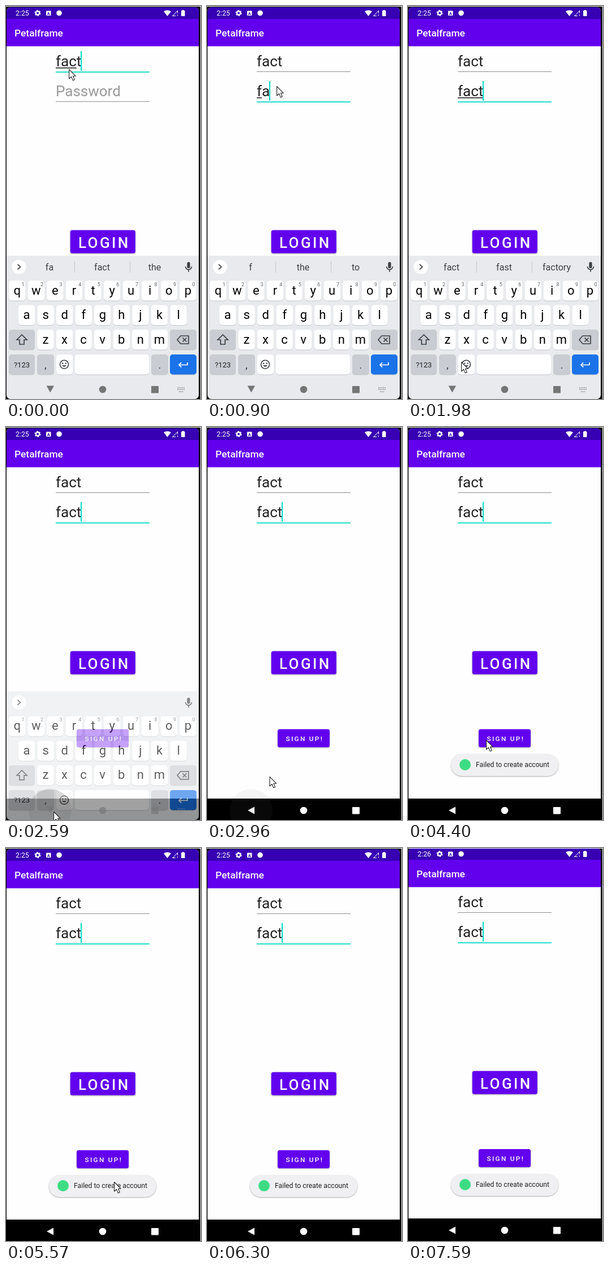
Write an HTML page that moves like this. It is 345 by 697 pixels and loops after 8000 ms.

```html
<!DOCTYPE html>
<html lang="en">
<head>
<meta charset="utf-8">
<title>Login screen</title>
<style>
html, body { margin: 0; width: 100%; height: 100%; overflow: hidden; background: #000; }
svg { display: block; width: 345px; height: 697px; font-family: Roboto, sans-serif; }
text { white-space: pre; }
.mid { text-anchor: middle; }
.med { font-weight: 500; }
.raised { filter: drop-shadow(0 1px 1px #0005); }
.soft { filter: drop-shadow(0 .5px .7px #0003); }
.line { fill: none; stroke-width: 1.7; }
</style>
</head>
<body>
<svg id="stage" viewBox="0 0 345 697"></svg>
<script>
const LOOP = 8000, WORD = 'fact';
const stage = document.getElementById('stage');

const rect = (x, y, w, h, fill, more = '') =>
  `<rect x="${x}" y="${y}" width="${w}" height="${h}" fill="${fill}" ${more}/>`;
const disc = (x, y, r, fill, more = '') =>
  `<circle cx="${x}" cy="${y}" r="${r}" fill="${fill}" ${more}/>`;
const path = (d, fill, more = '') => `<path d="${d}" fill="${fill}" ${more}/>`;
const line = (d, color, more = '') => `<path class="line" d="${d}" stroke="${color}" ${more}/>`;
const text = (x, y, size, fill, s, more = '') =>
  `<text x="${x}" y="${y}" font-size="${size}" fill="${fill}" ${more}>${s}</text>`;
const group = (id, body, more = '') => `<g id="${id}" ${more}>${body}</g>`;

function key(x, y, w, label = '', size = 22, fill = '#fff') {
  return rect(x, y + 1, w, 35.5, '#c3c6ca', 'rx="5"') + rect(x, y, w, 35.5, fill, 'rx="5"') +
    text(x + w / 2, y + (size > 15 ? 24.5 : 22.5), size, size > 20 ? '#000' : '#202124', label, 'class="mid"');
}

function keyRow(letters, x, y, hints = '') {
  return [...letters].map((c, i) => {
    const left = x + i * 33.57;
    return key(left, y, 29.5, c) +
      (hints ? text(left + 25, y + 9.5, 9, '#5f6368', hints[i], 'class="mid"') : '');
  }).join('');
}

function keyboard() {
  const grey = '#c9ccd2', ink = '#3c4043';
  return rect(1, 443, 340, 320, '#e8eaed') +
    disc(23, 462.7, 13, '#fff', 'class="soft"') +
    line('M20.5 458.2l5 4.5-5 4.5', ink, 'id="chevron"') +
    group('strip', rect(121, 453, 1, 20, '#c4c7cb') + rect(219, 453, 1, 20, '#c4c7cb') +
      [77, 170, 263].map(x => text(x, 469, 16, ink, '', 'class="mid"')).join('')) +
    rect(320.4, 454, 5.2, 11, ink, 'rx="2.6"') +
    line('M317.5 462a5.5 5.5 0 0 0 11 0M323 467.5v4', ink) +
    keyRow('qwertyuiop', 5, 487, '1234567890') +
    keyRow('asdfghjkl', 21.8, 530.5) +
    keyRow('zxcvbnm', 55.2, 574) +
    key(5, 574, 46, '', 22, grey) + key(290, 574, 47, '', 22, grey) +
    line('M28 583l-9 9h5v8h8v-8h5z', ink) +
    line('M309 585h14v14h-14l-6-7zM312.5 588.5l7 7m0-7l-7 7', ink) +
    key(5, 618, 46, '?123', 13, grey) + key(55, 618, 30, ',', 17, grey) +
    key(89, 618, 29) + key(122, 618, 131) +
    key(257, 618, 30, '.', 17, grey) + key(290, 618, 47, '', 22, '#1a73e8') +
    disc(103, 635.7, 7.5, 'none', `stroke="${ink}" stroke-width="1.6"`) +
    disc(100.3, 633.7, 1.2, ink) + disc(105.7, 633.7, 1.2, ink) +
    path('M99 637.2h8q-4 5.5-8 0z', ink) +
    line('M321 632v4.5h-15m4.2-4.2l-4.2 4.2 4.2 4.2', '#fff');
}

function statusBar() {
  return rect(1, 2, 340, 21, '#3700b3') +
    text(17, 17, 12.3, '#fff', '2:25', 'id="clock"') +
    disc(56, 12.5, 3.2, 'none', 'stroke="#fff" stroke-width="2.4"') +
    disc(56, 12.5, 4.8, 'none', 'stroke="#fff" stroke-width="1.4" stroke-dasharray="2.5 2.53"') +
    rect(71, 8.5, 8.5, 8.5, '#fff', 'rx="1"') +
    text(75.2, 15.6, 7.5, '#3700b3', 'A', 'class="mid" font-weight="700"') +
    disc(94, 12.5, 4.8, '#fff') +
    path('M279 9.5q6.5-4 13 0l-6.5 8.5z', '#fff') +
    line('M295 17.5l8-8.5', '#fff', 'style="stroke-width:1"') +
    line('M294 17.5h6M303.5 8v5m0 2v2.5', '#fff', 'style="stroke-width:1"') +
    rect(310, 8, 6.5, 10, '#fff', 'rx="1"') + rect(312, 7, 2.5, 2, '#fff');
}

const button = (id, x, y, w, h) => rect(x, y, w, h, '#6200ee', `id="${id}" rx="3.5" class="raised"`);

stage.innerHTML =
  `<defs><clipPath id="screen">${rect(1, 2, 340, 695, '#000', 'rx="7"')}</clipPath></defs>` +
  rect(0, 0, 345, 697, '#000') +
  group('phone',
    rect(1, 2, 340, 657, '#fefefe') +
    rect(1, 23, 340, 48.4, '#6200ee') + statusBar() +
    text(15, 54, 17.4, '#fff', 'Petalframe', 'class="med"') +
    text(88, 107, 26, '#212121', WORD, 'id="user"') +
    text(88, 160.3, 26, '#9a9a9a', 'Password', 'id="pass"') +
    rect(88, 116, 166, 2, '#03dac5', 'id="userLine"') +
    rect(88, 169, 166, 1, '#8f8f8f', 'id="passLine"') +
    rect(88, 109, 0, 1.6, '#212121', 'id="under"') +
    rect(132, 80, 2, 35, '#03dac5', 'id="caret"') +
    button('login', 113.7, 397.5, 115.2, 41) +
    text(128, 428.5, 26, '#fff', 'LOGIN', 'class="med" letter-spacing="3.35"') +
    button('sign', 125, 536, 92, 32) +
    rect(125, 536, 92, 32, '#fff', 'id="glow" rx="3.5"') +
    text(139.5, 556.8, 11.8, '#fff', 'SIGN UP!', 'class="med" letter-spacing="2.3"') +
    group('toast',
      rect(76, 580, 190, 39, '#f0f0f2', 'id="pill" rx="19.5" class="raised"') +
      group('note', disc(101, 599, 10, '#3ddc84') +
        text(120, 603.3, 12.2, '#222', 'Failed to create account'))) +
    rect(1, 659, 340, 40, '#000') +
    group('openNav', path('M72 680l12-6.5v13z', '#fff') + disc(171, 680, 6.3, '#fff') +
      rect(257, 674, 13, 12.5, '#fff', 'rx="1"')) +
    group('keys', keyboard()) +
    group('keysNav', path('M71.5 673.5h13.5l-6.7 12z', '#757575') + disc(171, 680, 6.3, '#757575') +
      rect(257, 674, 13, 12.5, '#757575', 'rx="1"') +
      line('M303 677h14M303 680h14M306 684h8', '#858585', 'stroke-dasharray="1.6 1.2"')) +
    disc(78, 680, 38, '#777', 'id="ripple"'), 'clip-path="url(#screen)"') +
  rect(0, 0, 345, 1, '#fff') + rect(344, 0, 1, 697, '#fff') +
  path('M-.4-.5V16L3.5 12.4L6.3 18.9L9.2 17.7L6.5 11.3H11.2Z', '#fff',
    'id="cursor" stroke="#222" stroke-width="1.1" stroke-linejoin="round"');

const el = {};
for (const node of stage.querySelectorAll('[id]')) el[node.id] = node;
const words = [...el.strip.querySelectorAll('text')];

// time, typed letters, underlined letters
const typing = [[0, 0, 0], [720, 1, 0], [900, 2, 1], [1080, 2, 2], [1170, 3, 2],
  [1350, 4, 3], [1530, 4, 4], [2500, 4, 0]];
const hints = [[0, 'fa fact the'], [360, ''], [900, 'f the to'], [1080, 'fa fact the'],
  [1350, 'fac fact face'], [1530, 'fact fast factory'], [2500, '']];
const caretOff = [2140, 3050, 3950, 4850, 5840, 7130];
const moves = [[0, 112, 113], [90, 112, 113], [360, 124, 143], [1530, 124, 143],
  [1980, 95, 632], [2250, 85, 683], [2700, 85, 683], [3230, 139, 556], [4800, 139, 556],
  [5120, 143, 589], [5250, 143, 589], [5570, 192, 593], [5840, 200, 667], [6060, 205, 702]];

const ramp = (t, a, b) => Math.min(1, Math.max(0, (t - a) / (b - a)));
const latest = (list, t) => list.filter(row => row[0] <= t).pop();
const set = (node, attrs) => {
  for (const name in attrs) node.setAttribute(name, attrs[name]);
};
const fade = (node, value) => set(node, { opacity: value });

function pointer(t) {
  const i = moves.findIndex(m => m[0] > t);
  if (i < 0) return moves[moves.length - 1].slice(1);
  const [a, b] = [moves[i - 1], moves[i]];
  const p = ramp(t, a[0], b[0]), e = p * p * (3 - 2 * p);
  return [1, 2].map(k => a[k] + (b[k] - a[k]) * e);
}

function drawFields(t) {
  const onPass = t >= 360;
  const [, typed, marked] = latest(typing, t);
  el.pass.textContent = typed ? WORD.slice(0, typed) : 'Password';
  set(el.pass, { fill: typed ? '#212121' : '#9a9a9a' });
  const styleLine = (node, y, on) =>
    set(node, { y: on ? y + .3 : y, height: on ? 1.75 : 1, fill: on ? '#03dac5' : '#8f8f8f' });
  styleLine(el.userLine, 116, !onPass);
  styleLine(el.passLine, 169, onPass);

  const count = onPass ? marked : 3;
  const field = onPass ? el.pass : el.user;
  set(el.under, { y: onPass ? 162 : 109, width: count ? field.getSubStringLength(0, count) : 0 });
  const width = onPass && !typed ? 0 : field.getComputedTextLength();
  set(el.caret, { x: 88 + Math.round(width) - (width ? 1 : 0), y: onPass ? 133 : 80 });
  fade(el.caret, caretOff.some(s => t >= s && t < s + 440) ? 0 : 1);
}

function drawKeyboard(t) {
  const gone = ramp(t, 2480, 2780);
  const list = latest(hints, t)[1];
  fade(el.strip, list ? 1 : 0);
  list.split(' ').forEach((word, i) => { words[i].textContent = word; });
  set(el.chevron, { transform: t >= 360 && t < 900 ? 'rotate(180 23 462.7)' : '' });
  set(el.keys, { opacity: 1 - gone, transform: `translate(0 ${70 * gone})` });
  fade(el.keysNav, 1 - gone);
  fade(el.openNav, ramp(gone, .4, 1));
  set(el.ripple, { r: 12 + 26 * ramp(t, 2290, 2560),
    opacity: .27 * ramp(t, 2270, 2400) * (1 - ramp(t, 2700, 3050)) });
}

function drawToast(t) {
  const enter = t < 6000 ? ramp(t, 3700, 3890) : ramp(t, 6020, 6210);
  const leave = t < 6000 ? ramp(t, 5640, 5820) : 0;
  const sx = .92 + .08 * enter, sy = .85 + .15 * enter;
  fade(el.toast, Math.min(1, enter * 3) * (1 - leave));
  set(el.toast, { transform: `translate(171 599.5) scale(${sx} ${sy}) translate(-171 -599.5)` });
  set(el.pill, { fill: enter < .5 ? '#e9e9eb' : '#f0f0f2' });
  fade(el.note, ramp(enter, .45, 1));
}

function draw(now) {
  const t = now % LOOP;
  drawFields(t);
  drawKeyboard(t);
  drawToast(t);
  fade(el.glow, .19 * ramp(t, 3500, 3650) * (1 - ramp(t, 4040, 4220)));
  const late = t >= 6680;
  el.clock.textContent = late ? '2:26' : '2:25';
  set(el.phone, { transform: `translate(0 ${late ? -2 : 0})` });
  set(el.cursor, { transform: `translate(${pointer(t)})` });
}

const start = performance.now();
function tick() {
  draw(performance.now() - start);
  requestAnimationFrame(tick);
}
tick();
</script>
</body>
</html>
```
